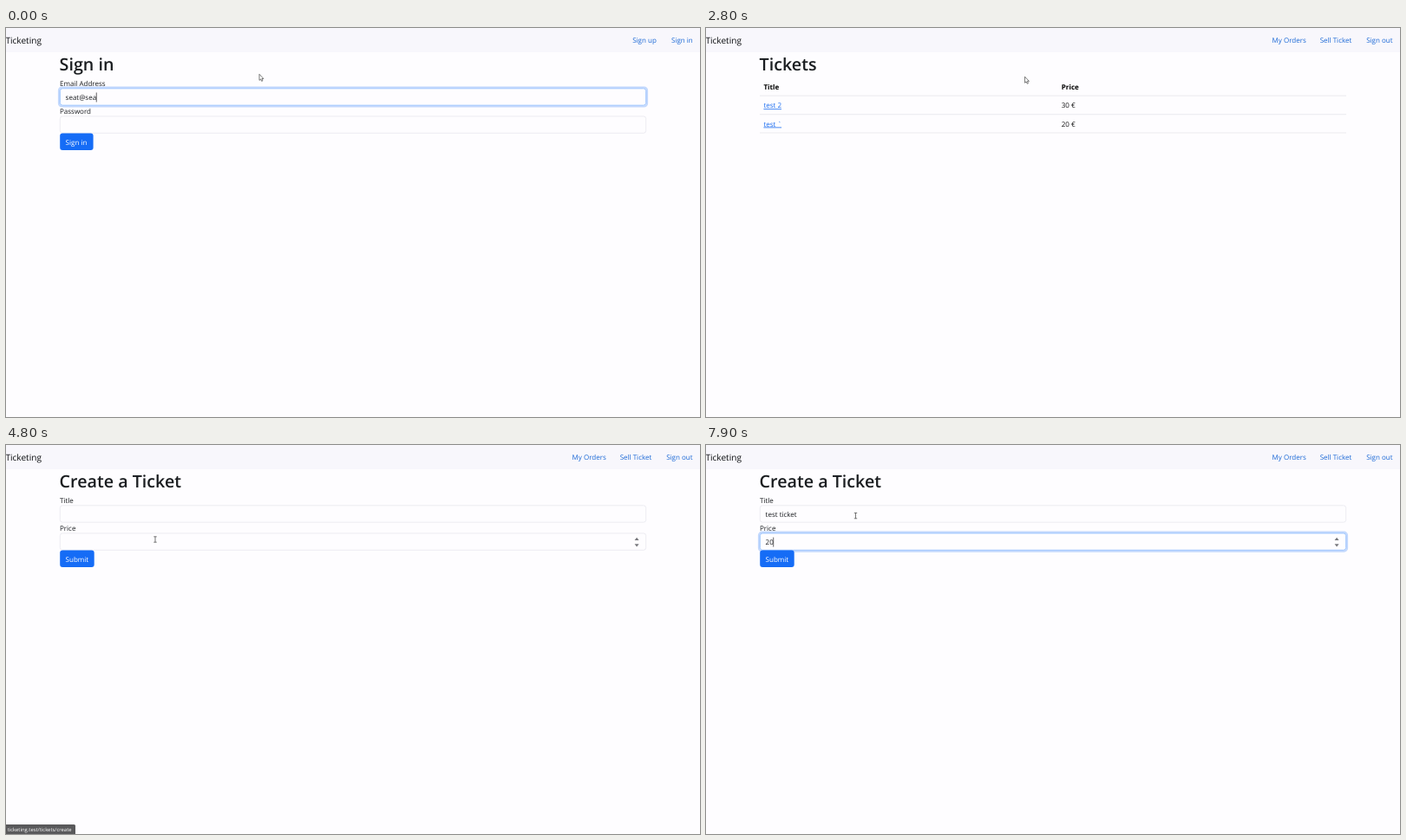
Animation, 800 px wide and 449 px high, one loop 8000 ms. Source, as an HTML page:

```html
<!DOCTYPE html>
<html lang="en">
<head>
<meta charset="utf-8">
<title>Ticketing</title>
<style>
  html, body { margin: 0; width: 100%; height: 100%; overflow: hidden; background: #fefdff; }
  svg { display: block; width: 100%; height: 100%; }
  text { font-family: "Open Sans", "Noto Sans", sans-serif; white-space: pre; text-rendering: geometricPrecision; }
</style>
</head>
<body>
<svg id="stage" viewBox="0 0 800 449"></svg>
<script>
const LOOP = 8000, TICK = 100, BODY = 8;
const INK = '#1a1d20', LINK = '#1a68d6', HOVER = '#0a58ca', BLUE = '#156cf6', PAGE = '#fefdff';
const stage = document.getElementById('stage');
const pen = document.createElement('canvas').getContext('2d');

// Tables of [start time, value]; the value holds until the next start.
const email = [[0, 'seat@sea'], [100, 'seat@sea.'], [600, 'seat@sea.t'], [800, 'seat@sea.te'],
  [1000, 'seat@sea.tes'], [1100, 'seat@sea.test']];
const password = [[0, ''], [1700, '•'], [1800, '••'], [2000, '•••'], [2100, '••••']];
const title = [[0, ''], [5500, 'te'], [5600, 'tes'], [5700, 'test'], [5800, 'test '], [5900, 'test t'],
  [6000, 'test ti'], [6100, 'test tic'], [6300, 'test tick'], [6400, 'test ticke'], [6500, 'test ticket']];
const price = [[0, ''], [7500, '2'], [7700, '20']];
const passwordFocus = [[0, 0], [1400, .5], [1500, 1]];
const titleFocus = [[0, 0], [5100, .5], [5200, 1], [7100, .5], [7200, 0]];
const priceFocus = [[0, 0], [7100, .5], [7200, 1]];
const titleCaret = [[0, false], [5200, true], [6900, false]];
const spinner = [[0, false], [4700, true], [4900, false], [7100, true]];
const view = [[0, signIn], [2600, tickets], [4300, createTicket]];
const pointerShape = [[0, arrow], [3800, hand], [4400, arrow], [4700, beam]];
// [time, x, y], eased in between
const pointerPath = [[0, 292, 53], [2600, 292, 53], [3400, 775.5, 71.5], [3600, 775.5, 71.5],
  [3900, 728, 13], [4300, 728, 13], [4700, 172, 109], [4800, 172, 109], [5000, 172.5, 81.6], [LOOP, 172.5, 81.6]];

const at = (table, t) => table.reduce((value, [start, next]) => t >= start ? next : value, null);

function pointerAt(t) {
  const i = pointerPath.findIndex(key => key[0] > t);
  const [t0, x0, y0] = pointerPath[i - 1], [t1, x1, y1] = pointerPath[i];
  const u = (t - t0) / (t1 - t0), e = u * u * (3 - 2 * u);
  return [x0 + (x1 - x0) * e, y0 + (y1 - y0) * e];
}

function text(x, y, str, { size = BODY, fill = INK, weight = 400, extra = '' } = {}) {
  return `<text x="${x}" y="${y}" font-size="${size}" font-weight="${weight}" fill="${fill}" ${extra}>${str}</text>`;
}

const rect = (x, y, w, h, fill, extra = '') =>
  `<rect x="${x}" y="${y}" width="${w}" height="${h}" fill="${fill}" ${extra}/>`;

const heading = str => text(61.6, 48.6, str, { size: 19.7, weight: 600 });

function textWidth(str) {
  pen.font = '80px "Open Sans", "Noto Sans", sans-serif';
  return pen.measureText(str).width * BODY / 80;
}

function field(y, label, value, focus, caret) {
  const ring = focus && rect(61, y - 1, 678, 22, 'none',
    `rx="3.6" stroke="${BLUE}" stroke-opacity="${.25 * focus}" stroke-width="2.2"`);
  const edge = focus ? `rgb(${232 - 98 * focus},${232 - 49 * focus},${238 + 16 * focus})` : '#e8e8ee';
  return text(62, y - 2.8, label) + (ring || '') +
    rect(62.3, y + .3, 675.4, 19.4, PAGE, `rx="2.8" stroke="${edge}" stroke-width=".8"`) +
    text(68.6, y + 13.2, value) +
    (caret ? rect(68.3 + textWidth(value), y + 5, .7, 11, '#222') : '');
}

const button = (label, width) =>
  rect(62.2, 121.5, width, 19.5, BLUE, 'rx="3"') + text(68.6, 134.6, label, { fill: '#fff' });

const navLink = (x, str, fill = LINK) => text(x, 16.8, str, { fill });

function navBar(links) {
  return rect(0, 0, 800, 28, '#f8f7fc') + text(-.6, 17.6, 'Ticketing', { size: 10.1, fill: '#0c0e10' }) + links;
}

function userNav(t) {
  const hovered = t >= 3800 && t < 4400;
  return navBar(navLink(652.6, 'My Orders') + navLink(707.7, 'Sell Ticket', hovered ? HOVER : LINK) +
    navLink(761.2, 'Sign out'));
}

function signIn(t) {
  const focus = at(passwordFocus, t);
  return navBar(navLink(722.2, 'Sign up') + navLink(767, 'Sign in')) + heading('Sign in') +
    field(69.5, 'Email Address', at(email, t), 1 - focus, focus < .5) +
    field(101.6, 'Password', at(password, t), focus, focus === 1) +
    button('Sign in', 38.4);
}

function tickets(t) {
  const line = y => rect(62, y, 676, .8, '#e5e5ea');
  const bold = { weight: 700, fill: '#000' }, plain = { fill: '#111' };
  const row = (y, name, cost) =>
    text(66.4, y, name, { fill: '#1a6cf0', extra: 'text-decoration="underline"' }) +
    text(409.8, y, cost, plain) + line(y + 7.1);
  return userNav(t) + heading('Tickets') +
    text(66.4, 71, 'Title', bold) + text(409.8, 71, 'Price', bold) + line(77.7) +
    row(92.3, 'test 2', '30 €') + row(113.5, 'test `', '20 €');
}

function createTicket(t) {
  const arrows = '<path d="M724.6 110l2.5-3.2 2.5 3.2zM724.6 114.2l2.5 3.2 2.5-3.2z" fill="#77777c"/>';
  const focus = at(priceFocus, t);
  return userNav(t) + heading('Create a Ticket') +
    field(69.5, 'Title', at(title, t), at(titleFocus, t), at(titleCaret, t)) +
    field(101.6, 'Price', at(price, t), focus, focus === 1) +
    (at(spinner, t) ? arrows : '') + button('Submit', 39.5);
}

function arrow() {
  return '<path d="M0 .3V7.4L1.6 6 2.7 8.4 3.9 7.9 2.9 5.5H4.9Z" fill="#fff" stroke="#444" stroke-width=".7"/>';
}

function hand() {
  return '<path d="M-.6 0Q.5-.8 1 .3V3L4.3 3.8V6.6L3.5 8.5H-.2L-2.3 5.2-1.6 4.5-.6 5.4Z" fill="#fff" stroke="#444" stroke-width=".7"/>';
}

function beam() {
  return '<path d="M-1.7-3.2H1.7M-1.7 3.2H1.7M0-3.2V3.2" fill="none" stroke="#555" stroke-width=".8"/>';
}

function statusBar(t) {
  if (t < 3800 || t >= 5000) return '';
  return '<path d="M0 438H78.5Q80 438 80 439.5V449H0Z" fill="#59595b"/>' +
    text(1.7, 445.8, 'ticketing.test/tickets/create', { size: 5.9, fill: '#fff' });
}

let shown = -1;
function frame(now) {
  const t = Math.floor(now % LOOP / TICK) * TICK;
  if (t !== shown) {
    shown = t;
    stage.innerHTML = at(view, t)(t) + statusBar(t) +
      `<g transform="translate(${pointerAt(t)})">${at(pointerShape, t)()}</g>`;
  }
  requestAnimationFrame(() => frame(performance.now() - begin));
}
const begin = performance.now();
frame(0);
</script>
</body>
</html>
```
